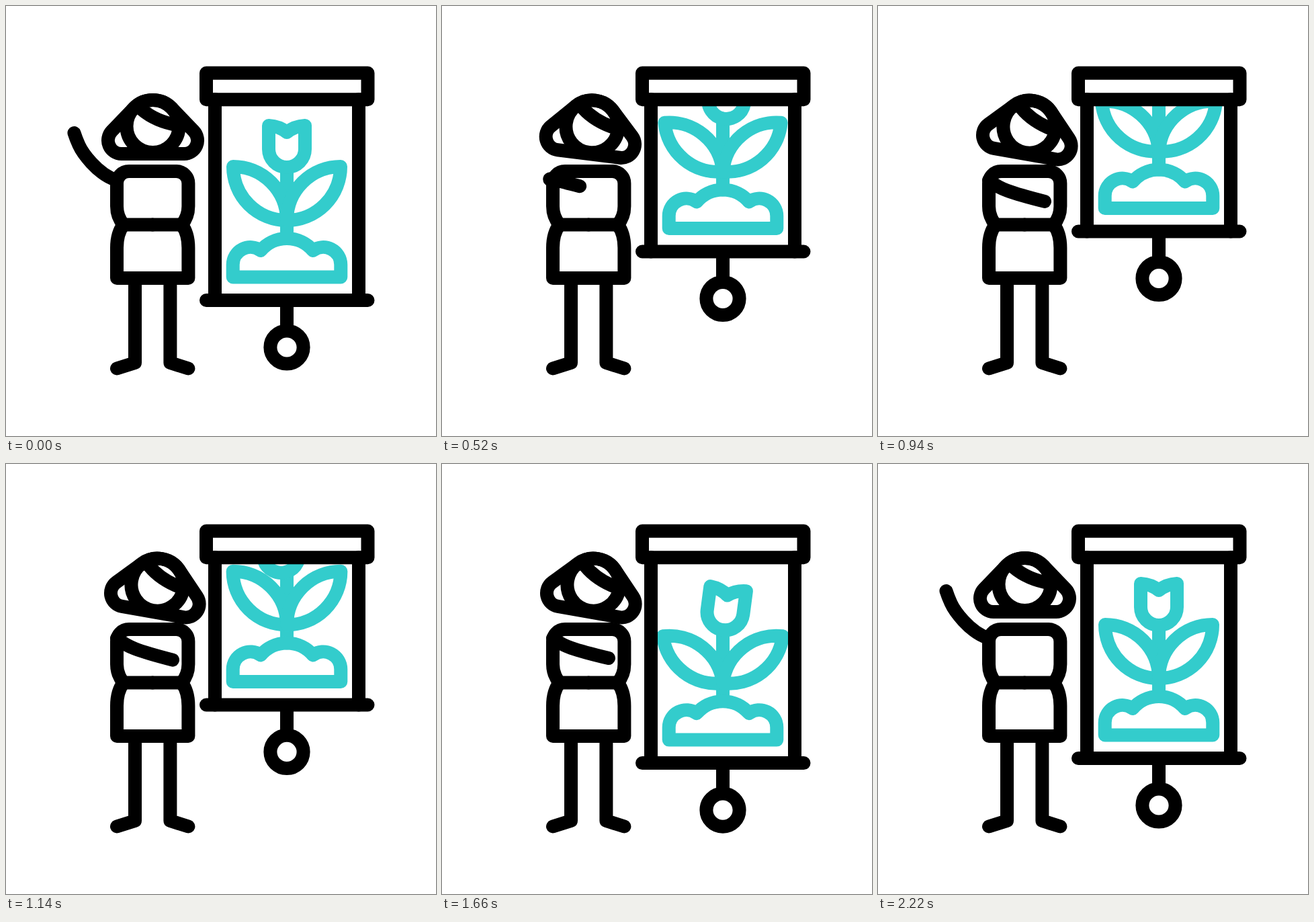
An HTML page for the animation above (2.4 s loop, 640 by 640 pixels).

```html
<!DOCTYPE html>
<html lang="en">
<head>
<meta charset="utf-8">
<title>Plant lesson</title>
<style>
  html, body { margin: 0; width: 100%; height: 100%; overflow: hidden; background: #fff; }
  svg { display: block; width: 100%; height: 100%; }
  .line { fill: none; stroke: #000; stroke-width: 20; stroke-linecap: round; stroke-linejoin: round; }
  .plant { stroke: #3cc; }
</style>
</head>
<body>
<svg viewBox="0 0 640 640">
  <clipPath id="canvas"><rect x="306" y="140" width="224" height="420"/></clipPath>

  <g clip-path="url(#canvas)">
    <g id="plant" class="line plant">
      <path d="M418 240V346"/>
      <path id="tulip" d="M391 178Q407 179 418 188Q429 179 445 178V213a27 27 0 0 1-54 0Z"/>
      <path id="leaf" d="M418 319a80 80 0 0 1-80-80a80 80 0 0 1 80 80Z"/>
      <use href="#leaf" transform="matrix(-1 0 0 1 836 0)"/>
      <path d="M337.700 403.500V385A26 26 0 0 1 379 364A51.300 51.300 0 0 1 457 364A26 26 0 0 1 498.300 385V403.500Z"/>
    </g>
  </g>

  <g class="line">
    <path id="sides"/>
    <rect x="298" y="99.700" width="240.500" height="39.600"/>
    <g id="pull">
      <path d="M298 438H538.500M418 438V475"/>
      <circle cx="418" cy="508" r="24.600"/>
    </g>
  </g>

  <g class="line">
    <g id="halfBody">
      <path d="M218.200 246H183a18 18 0 0 0-18 18V298Q165 314 175 325.500H218.200"/>
      <path d="M175 325.500Q165 338 165 360V405H218.200"/>
      <path d="M192 405V531L165 539.500"/>
    </g>
    <use href="#halfBody" transform="matrix(-1 0 0 1 436.400 0)"/>
    <path id="arm"/>
    <g id="head">
      <circle cx="218.500" cy="179" r="39"/>
      <path d="M190.200 152.200A39 39 0 0 1 246.800 152.200L279.500 186.200A20 20 0 0 1 265 220H172A20 20 0 0 1 157.500 186.200Z"/>
      <path d="M202 154Q223 172 256 177.500"/>
    </g>
  </g>
</svg>

<script>
const LOOP = 2400;
const BEAT = 500;
const $ = id => document.getElementById(id);
const mix = (a, b, k) => a + (b - a) * k;
const smooth = u => u * u * (3 - 2 * u);
const clamp = (x, max) => Math.min(max, Math.max(0, x));

// Eased 0 to 1 over a span of time.
const ramp = (t, from, span = BEAT) => smooth(clamp((t - from) / span, 1));

// Eased to and fro between 0 and 1, a given number of strokes.
function swing(t, from, span, strokes) {
  const phase = clamp((t - from) / span, strokes) % 2;
  return smooth(1 - Math.abs(1 - phase));
}

// Hand, curve handle, elbow, curve handle; the shoulder stays put.
const SHOULDER = [165, 259.5];
const RAISED = [[101.5, 189], [104, 197], [108.5, 207], [135, 250]];
const FOLDED = [[248, 301], [209, 288], [192, 279.5], [170, 264]];

function armPath(fold, lift) {
  const [hand, handle, elbow, upper] = RAISED.map(([x, y], i) => {
    const [fx, fy] = FOLDED[i];
    return [mix(x, fx, fold), mix(y, mix(fy, SHOULDER[1], lift), fold)];
  });
  return `M${hand}C${hand} ${handle} ${elbow}S${upper} ${SHOULDER}`;
}

const transform = (id, value) => $(id).setAttribute("transform", value);
const rotate = (id, angle, x, y) => transform(id, `rotate(${angle} ${x} ${y})`);

function draw(t) {
  const rise = -102.5 * ramp(t, 200) + 118.5 * ramp(t, 1000) - 16 * ramp(t, 1500, 300);
  const tilt = 16 * ramp(t, 200) - 36 * ramp(t, 700) + 28 * ramp(t, 1200) - 8 * ramp(t, 1700);
  const fold = ramp(t, 200) - ramp(t, 1700);

  transform("plant", `translate(0 ${rise})`);
  transform("pull", `translate(0 ${rise})`);
  $("sides").setAttribute("d", `M311 139V${438 + rise}M525 139V${438 + rise}`);
  rotate("tulip", tilt, 418, 240);
  rotate("leaf", -7 * swing(t, 200, BEAT, 4), 418, 319);
  rotate("head", 10 * fold, 218.5, 219);
  $("arm").setAttribute("d", armPath(fold, 0.3 * swing(t, 700, 1000 / 3, 3)));
}

const start = performance.now();
function tick() {
  draw((performance.now() - start) % LOOP);
  requestAnimationFrame(tick);
}
tick();
</script>
</body>
</html>
```
